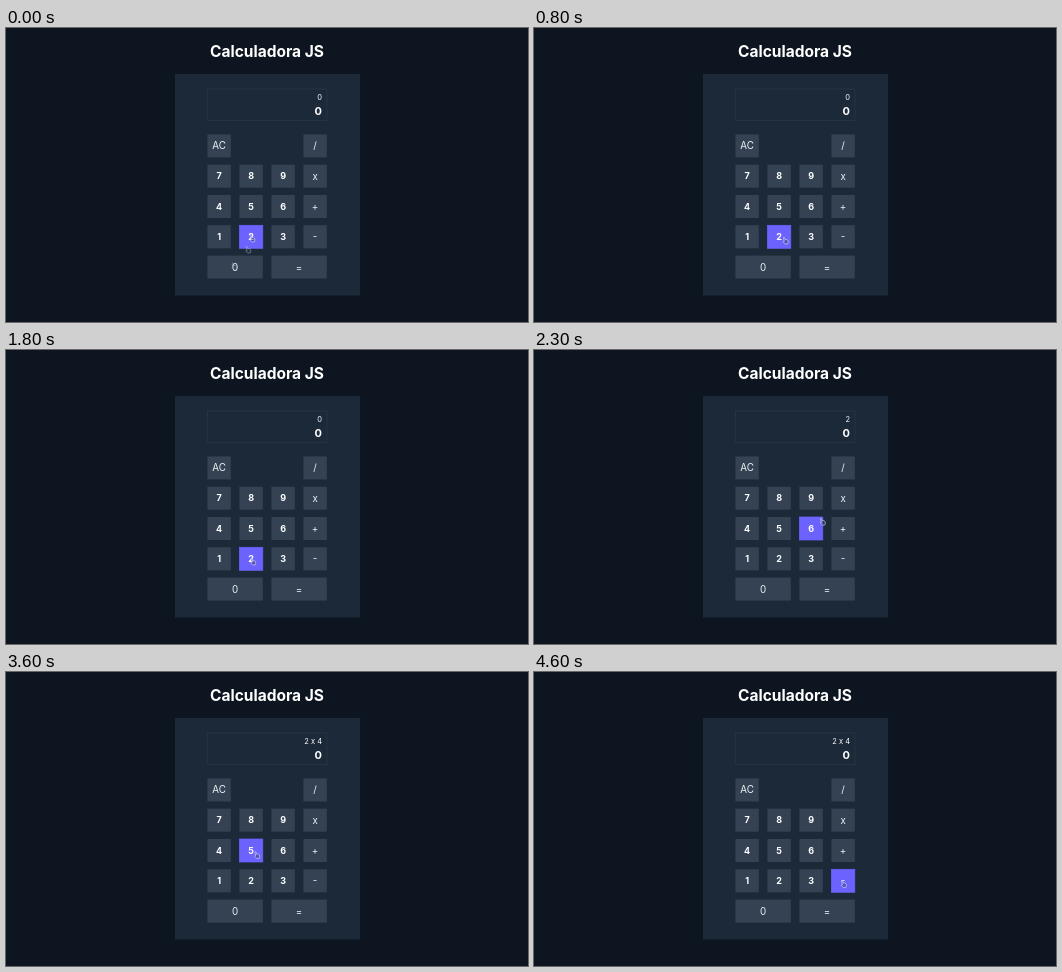
Recreate the animation shown at these times as an HTML page. Size 522 by 294 pixels, loop 5000 ms.

```html
<!DOCTYPE html>
<html lang="es">
<head>
<meta charset="utf-8">
<title>Calculadora JS</title>
<style>
  html, body { margin: 0; width: 100%; height: 100%; overflow: hidden; background: #0d1620; }
  svg { display: block; width: 100vw; height: 100vh; font-family: Inter, "Open Sans", sans-serif; }
  text { fill: #fff; }
  .panel { fill: #1c2939; }
  .screen { fill: none; stroke: #2a3747; stroke-width: .7; }
  .key rect { fill: #344254; }
  .key text { text-anchor: middle; fill: #eef1f5; }
  .key.hot rect { fill: #6c63ff; stroke: #6c63ff; stroke-width: .7; }
  .digit text { font-weight: 700; fill: #fff; }
  .cursor { fill: #3b4268; fill-opacity: .45; stroke: #dfe2ee; stroke-width: .6; stroke-linejoin: round; }
</style>
</head>
<body>
<svg viewBox="0 0 522 294" xmlns="http://www.w3.org/2000/svg">
  <defs>
    <path id="hand" d="M0 .6 Q.7-.4 1.2.5 L1.8 2.6 L2.9 2.4 L3.9 2.8 L4.6 3.4 L4.9 5.2 L4.4 6.8 L2 7.1 L-.2 4.9 Q-.1 3.9 1 4.3 Z"/>
    <path id="arrow" d="M0 0 L.2 5.3 L1.5 4.2 L2.6 6.3 L3.6 5.7 L2.6 3.8 L4.2 3.5 Z"/>
  </defs>
  <rect width="522" height="294" fill="#0d1620"/>
  <text x="261" y="28.7" font-size="15.5" font-weight="700" text-anchor="middle">Calculadora JS</text>
  <rect class="panel" x="169" y="46" width="185" height="221.5"/>
  <rect class="screen" x="201.5" y="61" width="119.5" height="31.5"/>
  <text id="formula" x="316" y="72" font-size="7.5" text-anchor="end">0</text>
  <text x="316" y="86.6" font-size="11" font-weight="700" text-anchor="end">0</text>
  <g id="keys"></g>
  <g id="trail" class="cursor">
    <use href="#hand" x="240" y="218"/>
    <use href="#hand" x="226" y="235"/>
  </g>
  <use id="cursor" class="cursor" href="#hand"/>
</svg>
<script>
const LOOP = 5000, STEP = 100;
const NS = "http://www.w3.org/2000/svg";
const $ = id => document.getElementById(id);

function add(parent, tag, attrs) {
  const el = document.createElementNS(NS, tag);
  for (const name in attrs) el.setAttribute(name, attrs[name]);
  return parent.appendChild(el);
}

function addKey(label, col, row, span) {
  const x = 201.4 + col * 32, y = 106.4 + row * 30.3;
  const w = span * 32 - 8.6, h = 23;
  const bold = /[1-9]/.test(label), size = bold ? 9 : 9.8;
  const el = add($("keys"), "g", { class: bold ? "key digit" : "key" });
  add(el, "rect", { x, y, width: w, height: h });
  add(el, "text", { x: x + w / 2, y: y + h / 2 + size * .36, "font-size": size })
    .textContent = label;
  return { el, x, y, w, h };
}

// One row per line; a two-key row spreads over the full width
const keys = ["AC . . /", "7 8 9 x", "4 5 6 +", "1 2 3 -", "0 ="].flatMap((line, row) => {
  const labels = line.split(" "), span = 4 / labels.length;
  return labels.flatMap((label, i) => label === "." ? [] : [addKey(label, i * span, row, span)]);
});

// Places the pointer eases between: time, x, y
const stops = [
  [0, 244, 207], [500, 262, 213], [800, 249.3, 209], [1100, 247, 208],
  [1400, 260, 211], [1800, 244.8, 208], [2000, 245, 207], [2500, 309, 147],
  [2800, 268, 163], [3200, 213, 179], [3600, 248.8, 179.5],
  [4000, 302, 175.5], [4400, 315, 209], [4600, 307.5, 208.5]
];

function tipAt(t) {
  const i = stops.findIndex(s => s[0] > t);
  if (i < 0) return stops[stops.length - 1].slice(1);
  const [t0, x0, y0] = stops[i - 1], [t1, x1, y1] = stops[i];
  const k = (t - t0) / (t1 - t0), ease = k * k * (3 - 2 * k);
  return [x0 + (x1 - x0) * ease, y0 + (y1 - y0) * ease];
}

function formulaAt(t) {
  return t < 2000 ? "0" : t < 2600 ? "2" : t < 3300 ? "2 x" : "2 x 4";
}

function draw(now) {
  const t = Math.floor(now % LOOP / STEP) * STEP;
  const [x, y] = tipAt(t);
  let over = false;
  for (const k of keys) {
    const hot = x >= k.x && x <= k.x + k.w && y >= k.y && y <= k.y + k.h;
    k.el.classList.toggle("hot", hot);
    over = over || hot;
  }
  $("cursor").setAttribute("href", over ? "#hand" : "#arrow");
  $("cursor").setAttribute("transform", `translate(${x} ${y})`);
  $("trail").setAttribute("opacity", Math.max(0, .6 - t / 300));
  $("formula").textContent = formulaAt(t);
}

const start = performance.now();
function tick() {
  draw(performance.now() - start);
  requestAnimationFrame(tick);
}
tick();
</script>
</body>
</html>
```
